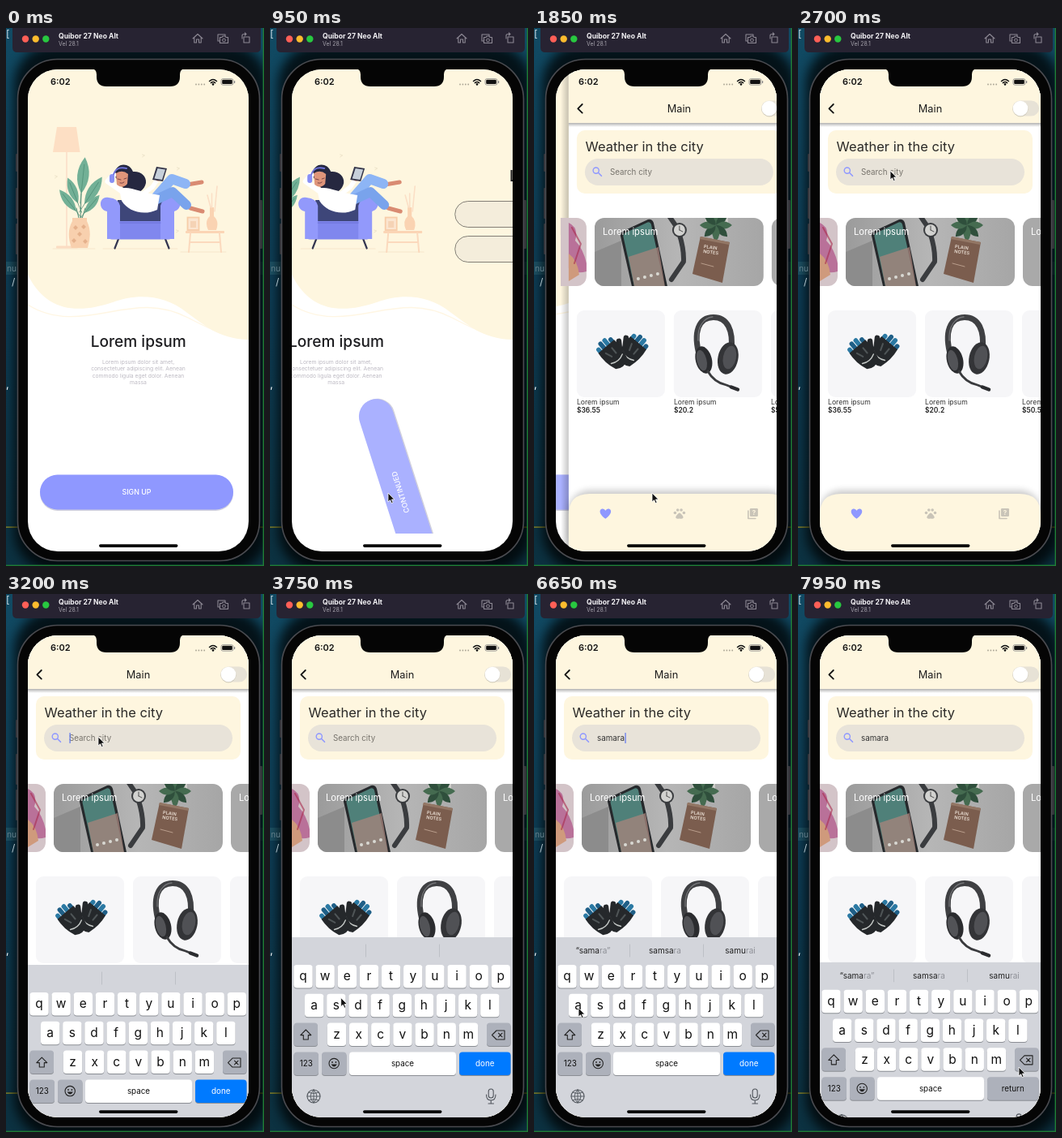
Animation, 319 px wide and 663 px high, one loop 8 s. Source, as an HTML page:

```html
<!DOCTYPE html>
<html lang="en">
<head>
<meta charset="utf-8">
<title>Phone app walkthrough</title>
<style>
html, body { margin: 0; width: 100%; height: 100%; overflow: hidden; background: #0e3a4e; }
svg { display: block; width: 100vw; height: 100vh; font-family: Inter, "Open Sans", sans-serif; }
.mid { text-anchor: middle; }
.line { fill: none; stroke-linecap: round; stroke-linejoin: round; }
</style>
</head>
<body>
<svg id="stage" viewBox="0 0 319 663"></svg>
<script>
const LOOP = 8000, PAGE = 273;
const CREAM = '#fef6df', PURPLE = '#8f98ff';

// Markup helpers
const text = (x, y, str, size, fill, extra = '') =>
  `<text x="${x}" y="${y}" font-size="${size}" fill="${fill}" ${extra}>${str}</text>`;
const rect = (x, y, w, h, r, fill, extra = '') =>
  `<rect x="${x}" y="${y}" width="${w}" height="${h}" rx="${r}" fill="${fill}" ${extra}/>`;
const circle = (x, y, r, fill, extra = '') => `<circle cx="${x}" cy="${y}" r="${r}" fill="${fill}" ${extra}/>`;
const oval = (x, y, rx, ry, angle, fill) =>
  `<ellipse rx="${rx}" ry="${ry}" transform="translate(${x} ${y}) rotate(${angle})" fill="${fill}"/>`;
const shape = (d, fill, extra = '') => `<path d="${d}" fill="${fill}" ${extra}/>`;
const line = (d, color, width = 1, extra = '') =>
  `<path class="line" d="${d}" stroke="${color}" stroke-width="${width}" ${extra}/>`;
const MID = 'class="mid"';

const defs = `<defs>
  <linearGradient id="desk" x2="0" y2="1"><stop stop-color="#114a63"/><stop offset=".5" stop-color="#0d3c54"/><stop offset="1" stop-color="#0c3140"/></linearGradient>
  <linearGradient id="edge"><stop stop-color="#000" stop-opacity="0"/><stop offset="1" stop-color="#000" stop-opacity=".22"/></linearGradient>
  <linearGradient id="drop" x2="0" y2="1"><stop stop-color="#000" stop-opacity=".3"/><stop offset="1" stop-color="#000" stop-opacity="0"/></linearGradient>
  <linearGradient id="photo"><stop stop-color="#9b9b9b"/><stop offset=".5" stop-color="#b6b6b6"/><stop offset="1" stop-color="#a6a6a6"/></linearGradient>
  <filter id="soft" x="-20%" y="-50%" width="140%" height="200%"><feGaussianBlur stdDeviation="4"/></filter>
  <filter id="halo" x="-20%" y="-20%" width="140%" height="140%"><feGaussianBlur stdDeviation="7"/></filter>
  <clipPath id="screen"><rect x="27" y="51" width="273" height="594" rx="37"/></clipPath>
  <clipPath id="safe"><rect x="27" y="51" width="273" height="572"/></clipPath>
  <clipPath id="sheet"><rect x="17" y="51" width="283" height="594"/></clipPath>
  <clipPath id="banner"><rect x="59" y="234" width="209" height="84" rx="12"/></clipPath>
</defs>`;

const desktop = () =>
  rect(0, 0, 319, 663, 0, 'url(#desk)') +
  rect(0, 288, 319, 16, 0, '#1d5266') +
  rect(0, 614.5, 319, 1.2, 0, '#a59a24') +
  rect(10, 20, 314, 650, 50, '#000', 'opacity=".75" filter="url(#halo)"') +
  text(0, 11, '[', 12, '#d5e4ec') + text(1, 300, 'nu', 10, '#65808c', 'font-family="Noto Sans Mono, monospace"') +
  text(7, 317, '/', 12, '#b9cbd2') + text(0, 444, ',', 13, '#fff') +
  rect(317.6, 0, 1.4, 663, 0, '#1f7d35') + rect(0, 661.6, 319, 1.4, 0, '#1f7d35') +
  shape('M8 0H315V24Q315 30 309 30H14Q8 30 8 24Z', '#272332') +
  circle(24, 13.5, 4.2, '#ff5f57') + circle(36.7, 13.5, 4.2, '#febc2e') + circle(49.3, 13.5, 4.2, '#28c840') +
  text(65, 13, 'Quibor 27 Neo Alt', 8.6, '#f3f2f5', 'font-weight="700"') +
  text(65, 21.5, 'Vel 28.1', 7, '#a5a2ab') +
  line('M231 13L237 7.5L243 13M232.8 12V18H235.5V14H238.5V18H241.2V12', '#8d8994', 1.1) +
  line('M264 16H262V8H271V10M264.5 11.5H267L268 10H271L272 11.5H274.5V18.5H264.5Z', '#8d8994', 1.1) +
  circle(269.5, 15, 1.9, 'none', 'stroke="#8d8994"') +
  line('M294 11H301V18H294ZM292 13V9Q292 7.5 295 7.5H297M295.3 5.8L297 7.5L295.3 9.2', '#8d8994', 1.1);

const bezel = () =>
  [[12, 155, 22], [12, 197, 38], [12, 241, 38], [313, 212, 60]].map(b => rect(b[0], b[1], 4, b[2], 1, '#33343a')).join('') +
  rect(14.5, 38.5, 299, 618, 49, '#050505', 'stroke="#4a4b50" stroke-width="1.6"');

const statusBar = () =>
  shape('M106 50Q112 51 112 57V60Q112 72 124 72H203Q215 72 215 60V57Q215 51 221 50Z', '#050505') +
  text(55, 70.3, '6:02', 11, '#111', 'font-weight="600"') +
  [235, 238.4, 241.8, 245.2].map(x => circle(x, 69.5, .9, '#a9a494')).join('') +
  line('M251.6 65.5Q256 61.5 260.4 65.5M253.4 67.6Q256 65.4 258.6 67.6', '#111', 1.6) + circle(256, 69.4, 1.3, '#111') +
  rect(266, 62.6, 15, 7.6, 2.2, 'none', 'stroke="#888" stroke-width=".8"') + rect(267.2, 63.8, 12.6, 5.2, 1.2, '#111') +
  rect(282, 65, 1.2, 3, .6, '#888');

// Onboarding and login
const leaf = (x, y, len, angle) =>
  `<g transform="translate(${x} ${y}) rotate(${angle})">` +
  shape(`M0 0Q${-len * .32} ${-len * .5} 0 ${-len}Q${len * .32} ${-len * .5} 0 0`, '#72b096') +
  line(`M0 12V${-len * .8}`, '#4c8c74', .7) + '</g>';

const illustration = () =>
  line('M58 272H110M120 272H212M216 276H272', '#f7e7cb', 1.2) +
  shape('M63 122H87L91.5 153H58Z', '#fddfc4') + rect(74, 153, 2, 116, 0, '#fbe3cd') + rect(62, 268.5, 27, 3, 1, '#fbdcc2') +
  leaf(87, 226, 34, -38) + leaf(89, 216, 34, -22) + leaf(93, 204, 45, 6) + leaf(97, 217, 40, 33) + leaf(97, 228, 29, 40) +
  line('M92 238L93 204M91 238L87 222M93 238L98 222', '#4c8c74', 1) +
  shape('M82 234H100V238Q107 252 101 271H81Q74 252 82 238Z', '#f8d0ae') +
  [[86, 246], [96, 245], [91, 254], [84, 262], [98, 263]].map(p => shape(`M${p[0]} ${p[1] - 3}l3 3l-3 3l-3 -3Z`, '#e5b18c')).join('') +
  // side table
  rect(222, 250, 48, 3, 1, '#fbd5b5') + line('M228 253L226 276M264 253L266 276M228 264H264', '#fbd9bd', 2) +
  rect(224.5, 233.5, 14, 15.5, 0, '#fbe5d0', 'stroke="#f7cda9" stroke-width="1.8"') + rect(228, 238, 7, 8, 0, '#f5d3b5') +
  shape('M250 249Q245 238 252 232V221H257V232Q264 238 260 249Z', '#fad3b2') + line('M254.5 221V204M258 226L261 195M253 221L249 206', '#fbdfc6', 1.6) +
  // armchair
  shape('M138 212H194V241H138Z', '#3e4679') +
  line('M139 260L134.5 271.5M197 260L201.5 271.5', '#343550', 2.2) + rect(127, 238, 78, 22.5, 4, '#8087ee') +
  shape('M127 209C115 206 113 224 125 226V260H141V219Q139 210 127 209Z', '#9299fb') +
  shape('M204 209C218 206 219 223 208 226V260H191V219Q193 210 204 209Z', '#9299fb') +
  line('M141 240H191', '#686fd4', 1) +
  // reader
  shape('M134 182C134 166 152 164 157 177C166 176 174 182 173 191C171 201 160 207 150 204Z', '#262840') +
  line('M203 188L224 193L242 190', '#d98b72', 5) + line('M205 206L228 222L243 226', '#d98b72', 5) +
  line('M184 210L205 186L222 192', '#8db5f5', 12) + line('M182 213L206 202L223 218', '#79a3ec', 12) +
  line('M146 203L126 189L133 181', '#fff', 7) +
  shape('M140 199C151 193 164 203 190 206L187 224C170 232 151 226 143 213Z', '#fff') +
  shape('M136 179Q144 174 151 180L150 192Q144 199 137 193Z', '#df957a') + line('M138 186l4 1M146 186l3 -1M141 191q3 1 5 -1', '#632f38', .8) +
  line('M132 184Q135 169 149 173', '#6e73d8', 2) + rect(128, 180, 6, 11, 3, '#888ff4') +
  line('M166 207L181 196L187 187', '#fff', 5.5) + circle(188, 186, 2.8, '#df957a') +
  shape('M186 171L199 173L194 189L181 187Z', '#343549') + shape('M187.5 173L197 174.5L193 187L183.4 185.5Z', '#c7d0da') +
  [[62, 183], [213, 173], [212, 250], [170, 157]].map(p => line(`M${p[0] - 1.5} ${p[1] - 1}l3 1l-3 2`, '#e9dfc5', .8)).join('');

const backdrop = () =>
  rect(27, 51, 365, 594, 0, '#fff') +
  line('M27 341C60 362 96 356 128 350S190 339 225 357S270 380 300 382', '#fff6e3', 1.4) +
  shape('M27 51H391V384H300C264 383 246 367 224 351C194 327 160 328 132 338C90 352 50 351 27 304Z', CREAM);

const headline = (x, y) => text(x, y, 'Lorem ipsum', 19.1, '#1d1d20', 'class="mid" font-weight="500"');
const blurb = ['Lorem ipsum dolor sit amet,', 'consectetuer adipiscing elit. Aenean', 'commodo ligula eget dolor. Aenean', 'massa'];
const onboarding = () => illustration() + headline(163.7, 392.5) +
  blurb.map((s, i) => text(163.5, 414 + i * 8.4, s, 6.8, '#bcb9c2', MID)).join('');
const login = () => headline(163.7, 189) +
  [213.5, 256.5].map(y => rect(37.5, y, 252, 32, 16, '#f4eddb', 'stroke="#77736b" stroke-width=".9"')).join('');

const button = () => `<g id="button">` +
  rect(42, 552, 239, 43, 21.5, '#c6c6d6', 'opacity=".8"') +
  rect(42, 550.5, 239, 43, 21.5, PURPLE) + rect(42, 550.5, 239, 43, 21.5, '#fff', 'id="press"') +
  text(161.5, 575, '', 8.9, '#fff', 'id="label" class="mid" font-weight="500"') + '</g>';

// Main page
const banner = () =>
  rect(-160, 234, 209, 84, 12, '#d3c4c8') +
  shape('M27 240Q40 246 35 262Q45 272 49 290V300Q36 304 27 296Z', '#b0568a', 'opacity=".75"') +
  shape('M27 278Q38 286 40 304L27 312Z', '#cf9a7c') + line('M31 246L42 266L34 290', '#a82a4c', 2, 'opacity=".6"') +
  rect(278, 234, 209, 84, 12, '#a9a9a9') + text(288, 255, 'Lorem ipsum', 11.2, '#fff') +
  `<g clip-path="url(#banner)">` + rect(59, 234, 209, 84, 0, 'url(#photo)') +
  shape('M59 276L92 262V318H59Z', '#8c8c8c') +
  // plant
  rect(196, 230, 28, 16, 6, '#d0cecb') +
  [0, 45, 90, 135, 180, 225, 270, 315].map((a, i) => `<g transform="translate(209 243) rotate(${a})">` +
    shape('M0 0Q-9 -10 0 -20Q9 -10 0 0', i % 2 ? '#2f4f3c' : '#456b50') + '</g>').join('') +
  // phone
  shape('M97 249L125 236Q130 235 132 240L149 318H105L91 256Q91 251 97 249Z', '#26292c') +
  shape('M98 252L124.5 239.5Q128 238.5 129 242L145.5 318H108L94.5 257Q94.5 253 98 252Z', '#4f8079') +
  shape('M101 282L138 270L146 318H108Z', '#a8857c', 'opacity=".75"') +
  [0, 1, 2, 3].map(i => circle(113 + i * 8, 309 - i * 2, 2, '#d9d8d2')).join('') +
  // watch
  line('M150 230L161 246Q170 270 169 288L154 310', '#3a3c3f', 6) + circle(164, 249, 9, '#3a3c3f') + circle(164, 249, 7, '#d2d2d0') +
  line('M164 249V244M164 249L168 251', '#444', .9) +
  // boxed notebook
  shape('M190 257L226 264L217 314L180 303Z', '#7b5d4e') + shape('M190 257L226 264L225 267L189 260Z', '#937765') +
  `<g transform="rotate(8 194 270)">` + text(194, 271, 'PLAIN', 5.6, '#eadfd4', 'font-weight="600"') + text(194, 277, 'NOTES', 5.6, '#eadfd4', 'font-weight="600"') + '</g>' +
  line('M191 290l15 4', '#b99d8b', 1) + '</g>' + text(69, 255, 'Lorem ipsum', 11.2, '#fff');

const glove = (x, y, angle, thumb) => `<g transform="translate(${x} ${y}) rotate(${angle})">` +
  [-10, -3.5, 3, 9.5].map((fx, i) => line(`M${fx} -6V${i % 3 ? -17 : -13}`, i % 2 ? '#1f5f87' : '#2b79a3', 5.6)).join('') +
  line(`M${thumb * 10} 4L${thumb * 16} -5`, '#25282b', 6.5) +
  shape('M-13 -10H12.5Q15 4 10 19Q0 25 -9 19Q-15 4 -13 -10Z', '#25282b') +
  line('M-9 10Q0 15 9 10', '#c5c9c7', 1.4) + line('M-6 -4L-3 4M4 -4L4 4', '#4f5557', 2) + '</g>';

const headset = () =>
  line('M189 405C180 374 188 356.5 206 356.5C223 356.5 231 372 228 398', '#3f4043', 7) +
  line('M187 385C186 368 194 357 205 356', '#737477', 1.3) +
  oval(194, 409, 10, 17, -14, '#2b2c2f') + oval(191.5, 409.5, 6, 13, -14, '#525357') +
  oval(224, 407, 12.5, 20, 12, '#333437') + oval(226, 406, 8, 14.5, 12, '#505155') +
  line('M199 423Q207 437 222 440L236 445.5', '#3a3b3e', 2.8) + line('M228 442.5L236 445.5', '#2b2c2f', 4.5);

const product = (x, price) => rect(x, 348, 109, 107, 9, '#f6f6f8') +
  text(x, 463.5, 'Lorem ipsum', 8.65, '#333') + text(x, 473.5, price, 8.5, '#222', 'font-weight="600"');

const navBar = () =>
  rect(27, 570, 273, 80, 26, '#000', 'opacity=".22" filter="url(#soft)"') +
  shape('M27 600Q27 574 53 574H274Q300 574 300 600V645H27Z', CREAM) +
  shape('M72.5 604.8C62 597 66 592 69.3 592.5Q71.5 592.8 72.5 594.8Q73.5 592.8 75.7 592.5C79 592 83 597 72.5 604.8Z', PURPLE) +
  [[158.5, 597.5], [161.8, 594], [166.2, 594], [169.5, 597.5]].map(p => circle(p[0], p[1], 1.8, '#c9c4b8')).join('') +
  shape('M164 597.5Q166 598 168.5 602Q169.5 605.5 164 604.5Q158.5 605.5 159.5 602Q162 598 164 597.5Z', '#c9c4b8') +
  line('M249 595V604.5H258', '#c9c4b8', 1.6) + rect(251, 592, 10, 10, 1.2, '#c9c4b8') +
  text(256, 600, '?', 8, CREAM, 'class="mid" font-weight="700"');

const mainPage = () => rect(17, 51, 10, 594, 0, 'url(#edge)') + rect(27, 51, 273, 594, 0, '#fff') +
  rect(27, 117, 273, 5, 0, 'url(#drop)') + rect(27, 51, 273, 66, 0, CREAM) +
  line('M43.8 94L38.4 99.3L43.8 104.6', '#111', 1.8) + text(163.5, 103.7, 'Main', 12.8, '#1d1d1d', MID) +
  rect(265, 89.5, 33, 19, 9.5, '#e7e2d6') + circle(275, 99.8, 9.6, '#bdb7a8', 'opacity=".6"') + circle(275, 99, 9.3, '#fff') +
  rect(37, 126, 253, 78, 10, CREAM) + text(47.6, 151.5, 'Weather in the city', 16.5, '#2b2a28') +
  rect(47, 161, 233, 33, 16.5, '#e8e3d9') + circle(60.8, 175.6, 3.6, 'none', `stroke="${PURPLE}" stroke-width="1.4"`) +
  line('M63.7 178.5L67.5 182.3', PURPLE, 1.6) + text(78, 181, '', 9.8, '#333', 'id="query"') +
  rect(0, 171, 1.2, 13, .5, '#5a74f0', 'id="caret"') +
  banner() + product(37, '$36.55') + product(157, '$20.2') + product(277, '$50.5') +
  glove(107, 396, 40, -1) + glove(80, 400, -40, 1) + headset() + navBar();

// Keyboard
const key = (x, y, w, label, size = 15.5, fill = '#fff', ink = '#111') =>
  rect(x, y + 1, w, 28.5, 4, '#8b8e94') + rect(x, y, w, 28.5, 4, fill) +
  text(x + w / 2, y + 14 + size * .35, label, size, ink, MID);
const keyRow = (letters, x, y) => [...letters].map((c, i) => key(x + i * 27.15, y, 23.4, c)).join('');
const GREY = '#adb1bb';

const keyboard = () => rect(27, 423, 273, 250, 0, '#d3d5db') +
  rect(118, 427, 92, 25, 4, '#e6e7eb', 'id="best"') +
  `<g id="dividers">` + line('M118.5 432V447M209.5 432V447', '#b7bac1', .8) + '</g>' +
  [73, 162, 255].map((x, i) => text(x, 443, '', 10, '#222', `id="hint${i}" class="mid"`)).join('') +
  keyRow('qwertyuiop', 29.3, 457) + keyRow('asdfghjkl', 43, 492.7) + keyRow('zxcvbnm', 70.8, 528.4) +
  key(29.5, 528.4, 29.5, '', 10, GREY) + line('M44.3 537L37.8 543.6H41.3V549H47.3V543.6H50.8Z', '#222', 1.1) +
  key(268, 528.4, 29.5, '', 10, GREY) + line('M280 538H290V549H280L274.5 543.5ZM282.5 541.2l4.6 4.6m0 -4.6l-4.6 4.6', '#222', 1.1) +
  key(29.5, 564.4, 30.5, '123', 9.8, GREY) + key(64, 564.4, 30.5, '', 10, GREY) +
  circle(79.2, 578.6, 6.2, 'none', 'stroke="#222" stroke-width="1.1"') + circle(77, 577, .9, '#222') + circle(81.4, 577, .9, '#222') +
  shape('M75.5 579.5H83Q79.2 585.5 75.5 579.5', '#222') + key(98, 564.4, 132, 'space', 9.8) +
  `<g id="done">` + key(234, 564.4, 63.5, 'done', 9.8, '#007aff', '#fff') + '</g>' +
  `<g id="return">` + key(234, 564.4, 63.5, 'return', 9.8, GREY) + '</g>' +
  circle(54, 619, 8, 'none', 'stroke="#50555c" stroke-width="1.1"') +
  line('M46 619H62M54 611V627M54 611Q46 619 54 627Q62 619 54 611M48 614Q54 617 60 614M48 624Q54 621 60 624', '#50555c', .9) +
  rect(270.2, 610, 6, 11, 3, 'none', 'stroke="#50555c" stroke-width="1.1"') +
  line('M267.5 617Q267.5 624 273.2 624T279 617M273.2 624V628M270 628H276.5', '#50555c', 1.1);

const stage = document.getElementById('stage');
stage.innerHTML = defs + desktop() + bezel() + `<g clip-path="url(#screen)">
  <g id="welcome">${backdrop()}<g id="pageOne">${onboarding()}</g><g id="pageTwo">${login()}</g>
  <g clip-path="url(#safe)">${button()}</g></g>
  <g id="main" clip-path="url(#sheet)">${mainPage()}</g><g id="keyboard">${keyboard()}</g></g>` +
  statusBar() + rect(115, 636.3, 97.5, 3.6, 1.8, '#050505') +
  `<path id="cursor" d="M0 0V11L2.6 8.7L4.3 12.6L6.1 11.8L4.4 8H7.8Z" fill="#111" stroke="#fff" stroke-width=".8"/>`;

// Timing
const clamp = v => Math.min(1, Math.max(0, v));
const smooth = v => (v = clamp(v), v * v * (3 - 2 * v));
const easeOut = v => 1 - (1 - clamp(v)) ** 3;
function routeCurve(v) { // cubic-bezier(.35, .91, .33, .97)
  if (v <= 0 || v >= 1) return clamp(v);
  const bez = (s, a, b) => 3 * s * (1 - s) ** 2 * a + 3 * s * s * (1 - s) * b + s ** 3;
  let lo = 0, hi = 1;
  for (let i = 0; i < 20; i++) {
    const s = (lo + hi) / 2;
    if (bez(s, .35, .33) < v) lo = s; else hi = s;
  }
  return bez(lo, .91, .97);
}

// Pointer stops: time, x, y
const path = [[300, 150, 668], [700, 146, 573], [2100, 146, 573], [2620, 114, 176], [3250, 114, 176], [3720, 88, 497],
  [3920, 83, 506], [4350, 55, 510], [4480, 55, 510], [4920, 245, 552], [5000, 245, 552], [5375, 55, 520], [5500, 55, 512],
  [5900, 122, 474], [6050, 122, 474], [6450, 55, 510], [6650, 55, 510], [7350, 273, 583], [8000, 273, 583]];
function pointer(t) {
  const i = Math.max(1, path.findIndex(p => p[0] > t)), a = path[i - 1], b = path[i];
  const k = smooth((t - a[0]) / (b[0] - a[0]));
  return [a[1] + (b[1] - a[1]) * k, a[2] + (b[2] - a[2]) * k];
}

// Typing: time, text, suggestions (part after | is pale)
const FOCUS = 2980, CLOSE = 7850;
const typing = [[FOCUS, '', []],
  [3900, 's', ['“s”', 'so', 'see']], [4420, 'sa', ['“sa”', 'say', 'same']], [4980, 'sam', ['“sa|m”', 'Sam', 'sa|m']],
  [5450, 'sama', ['“sama”', 'same', 'samba']], [6000, 'samar', ['“samar”', 'samba', 'smart']],
  [6520, 'samara', ['“sama|ra”', 'samsa|ra', 'samu|rai']]];

const el = id => document.getElementById(id);
const move = (id, x, y = 0) => el(id).setAttribute('transform', `translate(${x} ${y})`);
const show = (id, on) => el(id).setAttribute('visibility', on ? 'visible' : 'hidden');
const within = (t, a, b, fade) => Math.min(clamp((t - a) / 60), 1 - clamp((t - b) / fade));

function draw(t) {
  const swipe = smooth((t - 800) / 416), leave = smooth((t - 1500) / 416), route = routeCurve((t - 1575) / 500);
  move('pageOne', -PAGE * swipe);
  move('pageTwo', PAGE * (1 - swipe - leave));
  el('button').setAttribute('transform', `rotate(${-360 * swipe} 161.5 572)`);
  el('press').setAttribute('opacity', .24 * Math.max(within(t, 770, 1100, 150), within(t, 1500, 1950, 150)));
  el('label').textContent = t < 800 ? 'SIGN UP' : 'CONTINUED';
  move('welcome', -PAGE / 3 * route);
  move('main', PAGE * (1 - route));
  show('main', route > 0);

  const typed = typing.filter(k => k[0] <= t).pop() || [0, '', []];
  const focused = t >= FOCUS && t < CLOSE, query = el('query');
  query.textContent = typed[1] || 'Search city';
  query.setAttribute('fill', typed[1] ? '#333' : '#77736c');
  const width = typed[1] ? query.getComputedTextLength() : 0;
  el('caret').setAttribute('x', 78.5 + width);
  show('caret', focused && (t - typed[0]) % 1000 < 500);
  for (let i = 0; i < 3; i++) {
    const [head, tail = ''] = (typed[2][i] || '').split('|');
    el('hint' + i).innerHTML = `${head}<tspan fill="#8e9097">${tail}</tspan>`;
  }
  show('best', typed[1] === 'sam');
  show('dividers', typed[1] !== 'sam');
  show('done', t < CLOSE);
  show('return', t >= CLOSE);
  move('keyboard', 0, 240 * (1 - easeOut((t - 3000) / 420) + smooth((t - CLOSE) / 450)));

  show('cursor', t >= 300);
  move('cursor', ...pointer(t));
}

const start = performance.now();
function tick() {
  draw((performance.now() - start) % LOOP);
  requestAnimationFrame(tick);
}
tick();
</script>
</body>
</html>
```
